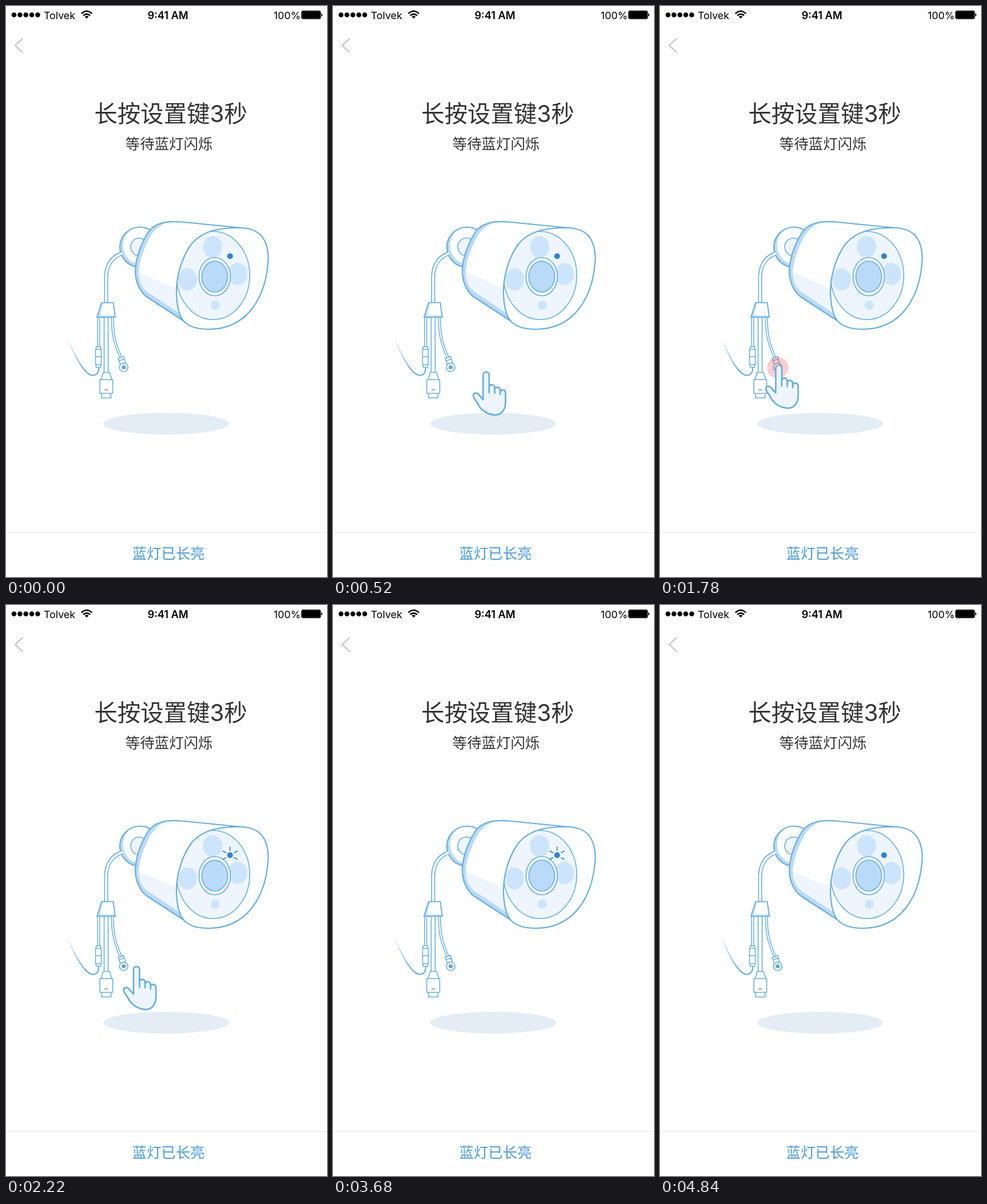
An HTML page that plays this animation: 561x998 px, repeating every 4.9 s.

```html
<!DOCTYPE html>
<html lang="zh-CN">
<head>
<meta charset="utf-8">
<style>
  html, body { margin: 0; width: 100%; height: 100%; overflow: hidden; background: #fff; }
  svg { display: block; width: 100%; height: 100%; }
  .status { font: 17.8px Inter, sans-serif; fill: #000; }
  .clock { font-size: 18.2px; font-weight: 600; text-anchor: middle; }
  .cjk { font-family: "Noto Sans CJK SC", "Noto Sans CJK", sans-serif; font-weight: 350; text-anchor: middle; fill: #333; }
  .digit { font-family: Inter, sans-serif; font-weight: 400; }
  .line { fill: none; stroke: #66aee0; stroke-width: 2.2; stroke-linejoin: round; }
  .thin { stroke-width: 1.6; }
  .white { fill: #fff; }
  .pale { fill: #eef5fe; }
  .spot { fill: #cde5fc; }
  .shade { fill: #badafa; }
  .core { fill: none; stroke: #fff; }
</style>
</head>
<body>
<svg viewBox="0 0 561 998">
  <defs>
    <path id="body" d="M408 387.5 L308 377.5 C276 375 258 381 248 396 C236 416 226 442 226 466 C227 486 236 503 250 511 L313 552 L370 540 Z"/>
    <path id="face" d="M408 387.5 C375 388 345 391 324 416 C306 441 297 475 298 504 C299 529 304 546 314 554 C325 563 340 565 354 565 C420 565 455 512 458.500 440 C457 403 440 388 408 387.500 Z"/>
    <clipPath id="bodyClip"><use href="#body"/></clipPath>
    <clipPath id="faceClip"><use href="#face"/></clipPath>
    <clipPath id="mountClip"><circle cx="234" cy="421.500" r="35"/></clipPath>
    <linearGradient id="wireFade" gradientUnits="userSpaceOnUse" x1="107" y1="580" x2="138" y2="636">
      <stop offset="0" stop-color="#66aee0" stop-opacity="0"/>
      <stop offset="1" stop-color="#66aee0"/>
    </linearGradient>
  </defs>

  <!-- status bar -->
  <path d="M14 15.5 H57" stroke="#000" stroke-width="8.600" stroke-linecap="round" stroke-dasharray="0 10.350"/>
  <text class="status" x="66" y="23">Tolvek</text>
  <g fill="none" stroke="#000" stroke-width="2.600">
    <path d="M131.700 13.300 Q141 4.700 150.300 13.300 M135 16.800 Q141 11.400 147 16.800"/>
    <path d="M137.600 18.600 Q141 16 144.400 18.600 L141 22 Z" fill="#000" stroke="none"/>
  </g>
  <text class="status clock" x="283" y="23">9:41 AM</text>
  <text class="status" x="515" y="23" text-anchor="end">100%</text>
  <rect x="516.500" y="8.500" width="33.500" height="14" rx="2.500" fill="#777" stroke="#000"/>
  <rect x="517.500" y="9.500" width="31.500" height="12" rx="1.200"/>
  <path d="M551 13 q2 .5 2 2.500 t-2 2.500 z"/>

  <path d="M29.500 56.500 L16 69 L29.500 81.500" fill="none" stroke="#c2c2c2" stroke-width="2"/>
  <text class="cjk" x="288" y="202.500" font-size="40.400">长按设置键<tspan class="digit">3</tspan>秒</text>
  <text class="cjk" x="285" y="249.500" font-size="25.400">等待蓝灯闪烁</text>
  <path d="M0 920.500 H561" stroke="#e5e5e5"/>
  <text class="cjk" x="284" y="966" font-size="25.400" style="fill:#4a9bd8">蓝灯已长亮</text>

  <ellipse cx="280" cy="730" rx="110" ry="19" fill="#e4edf6"/>

  <!-- mount -->
  <g clip-path="url(#mountClip)">
    <circle class="shade" cx="234" cy="421.500" r="35"/>
    <circle class="white" cx="239" cy="418.500" r="34.500"/>
  </g>
  <circle class="line" cx="234" cy="421.500" r="35"/>
  <ellipse class="line thin pale" cx="233" cy="421" rx="15" ry="15.500"/>

  <!-- cables -->
  <path class="line" style="stroke-width:7" d="M202 432.500 Q176 442 175 473 V519"/>
  <path class="core" stroke-width="3.800" d="M203 432.200 Q176 442 175 473 V520"/>
  <g class="line">
    <path style="stroke-width:5" d="M162 544 V597 M186 544 C186 575 190 590 201 615"/>
    <path style="stroke-width:8.600" d="M175 544 V641"/>
  </g>
  <g class="core">
    <path stroke-width="2" d="M162 544 V597 M186 544 C186 575 190 590 201 615"/>
    <path stroke-width="5.400" d="M175 544 V641"/>
  </g>
  <path d="M107 580 C119 609 136 644 151 645.500 C159 646 162 640 162 632" fill="none" stroke="url(#wireFade)" stroke-width="2.200"/>
  <g class="line thin">
    <path class="white" d="M167 518.500 H187.500 L191 544 H159 Z"/>
    <path class="shade" stroke="none" d="M167 518.500 H170 L164 541 H190.500 L191 544 H159 Z"/>
    <path d="M167 518.500 H187.500 L191 544 H159 Z"/>
    <path class="white" d="M157.500 595.500 H165.500 V600 H166.500 V627 H165.500 V631.500 H157.500 V627 H156.500 V600 H157.500 Z M156.500 600 H166.500 M156.500 613 H166.500 M156.500 627 H166.500"/>
    <path class="white" d="M170 640.500 H181 L185 653 H166 Z M164 653 H186.500 V677 H164 Z M167 677 H183.500 V685 H167 Z"/>
    <path class="white" d="M196 616 L205.500 612.500 L209 624 L200 627 Z M197.500 620 L207 617"/>
    <circle class="white" cx="205.700" cy="631.500" r="7.500"/>
  </g>
  <circle cx="205.700" cy="631.500" r="3.600" fill="#5fa8dc"/>
  <rect x="172" y="669" width="6.500" height="4" fill="#c3c8c4"/>

  <!-- camera -->
  <use href="#body" class="white"/>
  <g clip-path="url(#bodyClip)">
    <path class="pale" d="M226 463 L301 495 L320 560 L230 520 Z"/>
    <path class="shade" d="M290 375 C268 382 258 392 251 405 C238 430 232 449 232 469 C233 485 240 496 252 503 L306 539 L320 562 L220 520 L220 380 Z"/>
  </g>
  <use href="#body" class="line"/>
  <use href="#face" class="white"/>
  <g clip-path="url(#faceClip)">
    <ellipse class="pale" cx="362" cy="471" rx="64" ry="77"/>
    <ellipse class="spot" cx="361" cy="421" rx="17" ry="19"/>
    <ellipse class="spot" cx="404.500" cy="468.500" rx="17" ry="19.500"/>
    <ellipse class="spot" cx="317.500" cy="478" rx="16.500" ry="19.500"/>
    <circle class="spot" cx="365.700" cy="523" r="8"/>
    <ellipse class="line thin" cx="362" cy="471" rx="64" ry="77"/>
  </g>
  <use href="#face" class="line"/>
  <g class="line thin">
    <ellipse class="pale" cx="364.800" cy="473" rx="27.500" ry="33.500"/>
    <ellipse class="shade" cx="364.800" cy="473" rx="22.500" ry="27"/>
  </g>
  <circle cx="391.600" cy="437.200" r="5" fill="#2f82d6"/>
  <path id="rays" fill="none" stroke="#2f82d6" stroke-width="1.600"/>

  <circle id="press" cx="205.700" cy="632" r="18.600" fill="#ff4650" fill-opacity=".27"/>
  <path id="hand" class="line" style="fill:#eef5fe;stroke-width:2.700"
    d="M262.300 688 V645 C262.300 638 272.800 638 272.800 645 V676 V667 C273 660.500 282.500 661 282.500 667.500 V677 V670.500 C283.500 664.500 292 665.500 292 671.500 V679 V675 C293 669 301.500 670 301.500 677 V692 C301.500 707 294 715 283 715 C270 714 260 707 255 699 C252 692 246.500 687 245.300 682.500 C244 677 250 674.500 254 679 Z"/>
</svg>
<script>
  const LOOP = 4900;
  const [rays, press, hand] = ['rays', 'press', 'hand'].map(id => document.getElementById(id));

  const ease = (t, from, to) => {
    const p = Math.min(1, Math.max(0, (t - from) / (to - from)));
    return (1 - Math.cos(Math.PI * p)) / 2;
  };
  // Rises over one interval, holds, then falls over another.
  const pulse = (t, riseFrom, riseTo, fallFrom, fallTo) =>
    ease(t, riseFrom, riseTo) - ease(t, fallFrom, fallTo);

  rays.setAttribute('d', [-150, -90, -30, 30, 150].map(deg => {
    const a = deg * Math.PI / 180;
    const at = r => `${391.6 + r * Math.cos(a)} ${437.2 + r * Math.sin(a)}`;
    return `M${at(8)} L${at(15)}`;
  }).join(' '));

  function blink(t) {
    if (t < 2600) return pulse(t, 1800, 2100, 2240, 2660);
    return Math.max(0.03, pulse((t - 2600) % 800, 0, 290, 330, 650));
  }

  function draw(now) {
    const t = now % LOOP;
    const reach = pulse(t, 130, 830, 2050, 2750);
    hand.setAttribute('transform', `translate(${87 - 147 * reach} ${17 - 29 * reach})`);
    hand.setAttribute('opacity', pulse(t, 100, 320, 2640, 2850));
    press.setAttribute('opacity', pulse(t, 700, 880, 1770, 2000));
    rays.setAttribute('opacity', blink(t));
  }

  const start = performance.now();
  function frame() {
    draw(performance.now() - start);
    requestAnimationFrame(frame);
  }
  frame();
</script>
</body>
</html>
```
